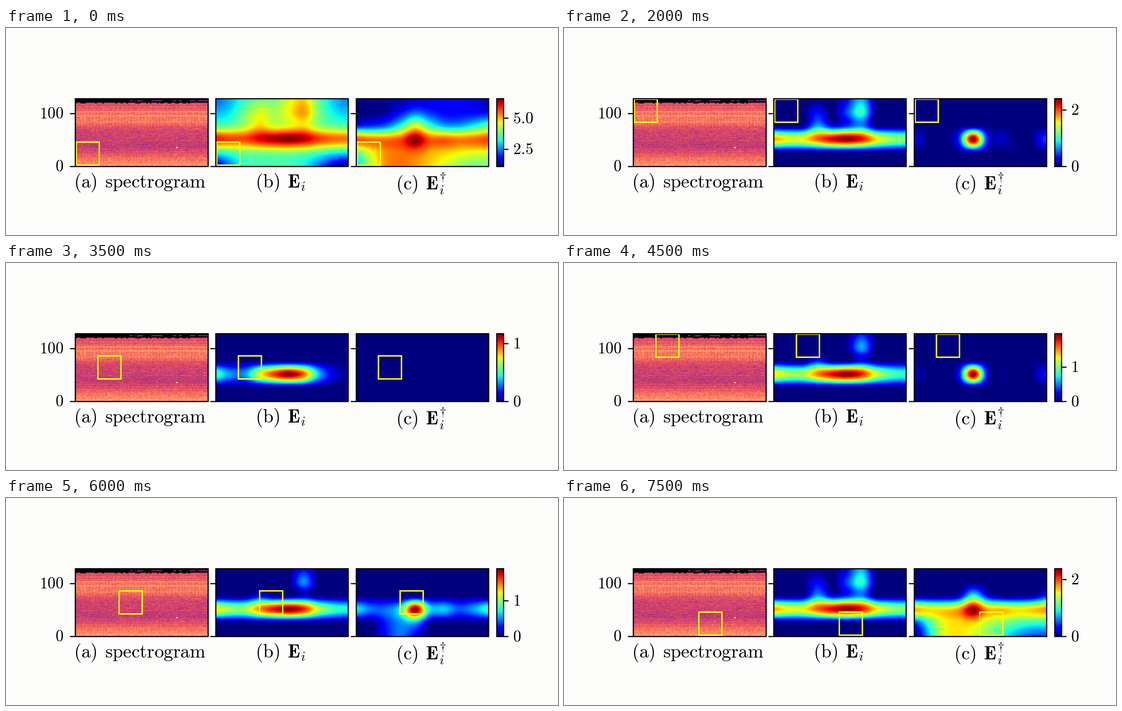
A matplotlib script that plays this animation: 1222 by 458 pixels, repeating every 8000 ms.

```python
import numpy as np
import matplotlib.pyplot as plt
from matplotlib.animation import FuncAnimation
from matplotlib.patches import Rectangle

W, H, DPI = 1222, 458, 128
PX = 72 / DPI
TOP, BOTTOM = 156, 306
PANELS = [(153, 446.5), (464, 757), (774.5, 1068)]
BAR = (1086, 1100.5)
FRAMES, ROWS = 16, 5
BASE, SPAN = 1.12, 5.44

# Coarse 6 x 10 node grid: v runs down, u runs right
v, u = np.mgrid[0:6, 0:10]


def bump(amp, u0, v0, su, sv):
    return amp * np.exp(-((u - u0) / su)**2 - ((v - v0) / sv)**2)


def ridge(amp, v0, sv):
    return amp * np.exp(-((v - v0) / sv)**2)


def unit(field):
    field = np.clip(field, 0, None)
    return field / field.max()


def map_b():
    band = ridge(.365, 3, .7) + bump(.17, 4.8, 3, 2, .7) + bump(.095, 0, 3, 1.2, .7)
    hills = (bump(.29, 5.8, .7, 1, 1.6) + bump(.19, 2.9, 1.6, 1, 1.1)
             + bump(.07, 4.5, 1, 2.5, 2))
    corners = (bump(.22, 0, 0, 1.6, 1.5) + bump(.20, 9, 0, 1.5, 1.5)
               + bump(.38, 0, 5, 1.2, .9) + bump(.45, 9, 5, 2.2, .9))
    return unit(.45 + band + hills - corners)


def map_c():
    step = .02 + .74 / (1 + np.exp(-2.6 * (v - 2.3)))
    band = ridge(.135, 3, .6) + bump(.18, 4, 3, .7, .8) + bump(.03, 6, 3, .6, .6)
    edges = bump(.07, 0, 3, .9, .6) + bump(.04, 9, 3, 1, .6)
    hills = (bump(.36, 4, 1.7, 1.15, .8) + bump(.2, 9, 1.9, 1.2, .8)
             + bump(.11, 6.5, 0, 2.2, 1.6) + bump(.05, 3.2, 4.6, 1.3, 1.2))
    dips = (bump(.5, 0, 4.7, 1.1, .95) + bump(.12, 0, 1.8, 2.2, .9)
            + bump(.28, 8.5, 5.2, 3.2, 1.4))
    return unit(step + band + edges + hills - dips)


def cubic(n, size):
    """Matrix that resamples n nodes to size points with a cubic kernel."""
    t = np.linspace(0, n - 1, size)
    left = np.floor(t).astype(int)
    out = np.zeros((size, n))
    for k in range(-1, 3):
        d = np.abs(t - left - k)
        w = np.where(d < 1, 1.5 * d**3 - 2.5 * d**2 + 1,
                     -.5 * d**3 + 2.5 * d**2 - 4 * d + 2)
        np.add.at(out, (np.arange(size), np.clip(left + k, 0, n - 1)), w)
    return out


UP_V, UP_U = cubic(6, 150), cubic(10, 293)


def energy(nodes, cut):
    """Clip the nodes at the cut, then upsample and scale to the maximum."""
    rest = np.clip(nodes - cut, 0, None) / max(1 - cut, 1e-6)
    field = UP_V @ rest @ UP_U.T
    return field / max(field.max(), 1e-6)


def cut_levels(k):
    """Cuts of both maps: low at the bottom row, highest near the middle."""
    keys = [0, 2, 4, 5, 7, 9, 10, 12, 14, 15]
    b = [0, .588, .56, .517, .785, .638, .54, .651, .6, .5625]
    c = [0, .87, .8, .40, 1, .81, .4, .72, .7, .36]
    return np.interp(k, keys, b), np.interp(k, keys, c)


def spectrogram():
    rng = np.random.default_rng(4)
    h, w = 150, 292
    y = np.arange(h)
    level = np.interp(y, [10, 28, 50, 70, 105, 135, 149],
                      [.61, .68, .72, .58, .53, .71, .79])
    tall = rng.normal(size=(h // 5, w)).repeat(5, axis=0)
    wide = rng.normal(size=(h, w // 8 + 1)).repeat(8, axis=1)[:, :w]
    streak = np.where((y > 64) & (y < 118), .03, .012)[:, None]
    img = level[:, None] + streak * wide + .026 * tall
    img += .03 * rng.normal(size=(h, w)) + .014 * rng.normal(size=(h, 1))
    img[[14, 22]] -= .07
    img[[29, 38]] = .85 + .03 * rng.normal(size=(2, w))
    img[30:62, ::7] += .05
    img[107:110, 221:226] = .84

    img[:10] = 0
    dash = (rng.random(w) < np.linspace(.05, .7, w))[::6].repeat(6)[:w]
    img[4:6] = .42 * dash
    img[1:9, 133:143:4] = .4
    img[9:11] = np.where(rng.random(w // 4) < .35, .05, .55).repeat(4)
    return img


plt.rcParams["mathtext.fontset"] = "cm"
fig = plt.figure(figsize=(W / DPI, H / DPI), dpi=DPI, facecolor="#fdfdfc")
ax = fig.add_axes([0, 0, 1, 1])
ax.axis("off")


def image(data, x0, x1, cmap, interp="bilinear"):
    return ax.imshow(data, cmap=cmap, vmin=0, vmax=1, aspect="auto",
                     extent=(x0, x1, BOTTOM, TOP), interpolation=interp, zorder=1)


def label(x, y, s, size, ha="center"):
    return ax.text(x, y, s, fontsize=size * PX, ha=ha, va="baseline")


def frame(x0, x1):
    ax.add_patch(Rectangle((x0, TOP), x1 - x0, BOTTOM - TOP, fill=False,
                           ec="black", lw=2.6 * PX, joinstyle="miter", zorder=4))


def tick(x0, x1, y):
    return ax.plot([x0, x1], [y, y], color="black", lw=2.5 * PX,
                   solid_capstyle="butt", zorder=4)[0]


nodes_b, nodes_c = map_b(), map_c()
image(spectrogram(), *PANELS[0], "magma", "nearest")
im_b = image(energy(nodes_b, 0), *PANELS[1], "jet")
im_c = image(energy(nodes_c, 0), *PANELS[2], "jet")
image(np.linspace(1, 0, 256)[:, None], *BAR, "jet")

boxes = []
for x0, x1 in PANELS:
    frame(x0, x1)
    for y in (188.5, 306):
        tick(x0 - 12, x0, y)
    box = Rectangle((x0, TOP), 51, 50.7, fill=False, ec="#ffff00",
                    lw=3.2 * PX, joinstyle="miter", zorder=3)
    boxes.append(ax.add_patch(box))
frame(*BAR)

label(127, 200, "$100$", 35, "right")
label(127, 317, "$0$", 35, "right")
label(296.5, 352.5, r"$\mathrm{(a)\:\:spectrogram}$", 41.6)
label(608, 352.5, r"$\mathrm{(b)}\:\:\mathbf{E}_i$", 41.6)
label(918, 358, r"$\mathrm{(c)}\:\:\mathbf{E}_i^{\dagger}$", 41.6)

bar_ticks = [tick(BAR[1], BAR[1] + 11, BOTTOM) for _ in range(2)]
bar_labels = [label(1122, BOTTOM, "", 35, "left") for _ in range(2)]

ax.set_xlim(0, W)
ax.set_ylim(H, 0)


def draw(k):
    col, row = divmod(k, ROWS)
    for box, (x0, _) in zip(boxes, PANELS):
        box.set_xy((x0 + 2 + 47.7 * col, 252.4 - 23.75 * row))

    cut_b, cut_c = cut_levels(k)
    im_b.set_data(energy(nodes_b, cut_b))
    im_c.set_data(energy(nodes_c, cut_c))

    peak = SPAN * (1 - cut_b)
    if cut_b == 0:
        low, values, style = BASE, (2.5, 5.0), "${:.1f}$"
    else:
        low, values, style = 0, (0, 2 if peak >= 2 else 1), "${:d}$"
    for line, text, value in zip(bar_ticks, bar_labels, values):
        y = BOTTOM - (value - low) / peak * (BOTTOM - TOP)
        line.set_ydata([y, y])
        text.set_y(y + 11.5)
        text.set_text(style.format(value))
    return [im_b, im_c, *boxes, *bar_ticks, *bar_labels]


anim = FuncAnimation(fig, draw, frames=FRAMES, interval=500,
                     repeat=True, repeat_delay=0, blit=False)
plt.show()
```
